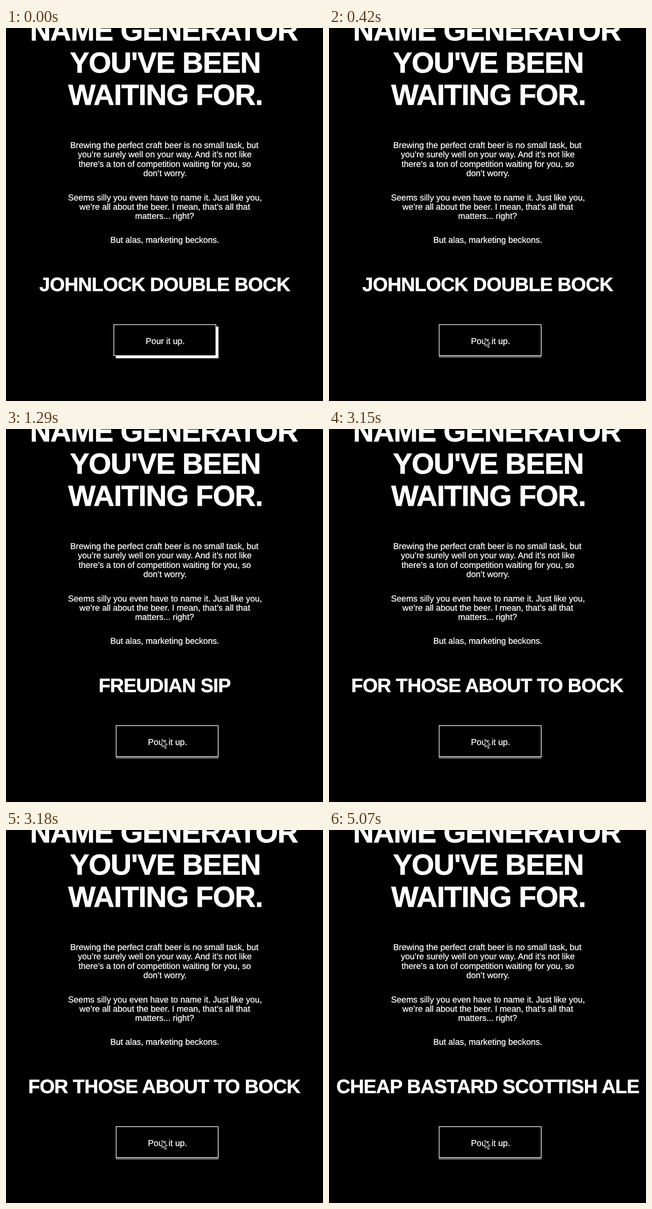
These frames come from a looping animation (690x811 px, 6.06 s). An HTML page with a canvas:

```html
<!DOCTYPE html>
<html lang="en">
<head>
<meta charset="utf-8">
<title>Beer name generator</title>
<style>
  html, body { margin: 0; width: 100%; height: 100%; overflow: hidden; background: #000; }
  canvas { display: block; }
</style>
</head>
<body>
<canvas id="stage" width="690" height="811"></canvas>
<script>
const ctx = document.getElementById('stage').getContext('2d');
const LOOP = 6060;
const STEP = 30;
const FAMILY = '"Liberation Sans", Arial, sans-serif';

// track is letter spacing, heft thickens the strokes; both in px.
const TITLE = { font: `bold 63px ${FAMILY}`, track: -1.2, heft: 0.8 };
const RESULT = { font: `bold 42.2px ${FAMILY}`, track: -0.85, heft: 0.6 };
const BODY = { font: `18.6px ${FAMILY}`, track: -0.05, heft: 0.3 };
const LABEL = { font: `18.8px ${FAMILY}`, track: -0.05, heft: 0.3 };

const title = ['NAME GENERATOR', "YOU'VE BEEN", 'WAITING FOR.'];

const paragraphs = [
  [261, ['Brewing the perfect craft beer is no small task, but',
         'you’re surely well on your way. And it’s not like',
         'there’s a ton of competition waiting for you, so',
         'don’t worry.']],
  [374.5, ['Seems silly you even have to name it. Just like you,',
           'we’re all about the beer. I mean, that’s all that',
           'matters... right?']],
  [467, ['But alas, marketing beckons.']],
];

const results = [
  [0, 'JOHNLOCK DOUBLE BOCK'],
  [1290, 'FREUDIAN SIP'],
  [2190, 'CHARLES BARLEY'],
  [3150, 'FOR THOSE ABOUT TO BOCK'],
  [4080, 'CHARLES BARLEY'],
  [5070, 'CHEAP BASTARD SCOTTISH ALE'],
];

const arrow = [[0, 0], [0, 17], [3.8, 13.5], [6.6, 20], [9.4, 18.9], [6.7, 12.6], [11.6, 12.2]];
const enter = { x: 601, y: 787 };
const rest = { x: 339.5, y: 674.5 };
const MOVE_START = 30, MOVE_TIME = 390;
const HOVER_START = 210, HOVER_TIME = 210;

const clamp = v => Math.min(1, Math.max(0, v));
const mix = (a, b, k) => a + (b - a) * k;
const easeOut = k => 1 - (1 - k) ** 2;

// Centres the visible ink of a line on cx.
function centerText(str, style, cx, y) {
  ctx.font = style.font;
  ctx.letterSpacing = style.track + 'px';
  ctx.lineWidth = style.heft;
  ctx.lineJoin = 'miter';
  ctx.fillStyle = ctx.strokeStyle = '#fff';
  const m = ctx.measureText(str);
  const x = cx - (m.actualBoundingBoxRight - m.actualBoundingBoxLeft) / 2;
  ctx.fillText(str, x, y);
  ctx.strokeText(str, x, y);
}

function drawCopy() {
  title.forEach((line, i) => centerText(line, TITLE, 346, 27.3 + i * 69.7));
  for (const [top, lines] of paragraphs)
    lines.forEach((line, i) => centerText(line, BODY, 345.5, top + i * 20.3));
}

function drawButton(k) {
  const x = mix(234, 239, k), y = 644.3, w = 223.5, h = 68.8;
  const grey = Math.round(mix(255, 88, k));
  ctx.fillStyle = `rgb(${grey},${grey},${grey})`;
  ctx.fillRect(239, y + mix(5, 4, k), w, h);
  ctx.fillStyle = '#fff';
  ctx.fillRect(x, y, w, h);
  ctx.fillStyle = '#000';
  ctx.fillRect(x + 1.4, y + 1.4, w - 2.8, h - 2.8);
  centerText('Pour it up.', LABEL, x + 112.5, 686.5);
}

function drawCursor(k) {
  ctx.save();
  ctx.translate(mix(enter.x, rest.x, k), mix(enter.y, rest.y, k));
  ctx.beginPath();
  arrow.forEach(([x, y]) => ctx.lineTo(x, y));
  ctx.closePath();
  ctx.fillStyle = '#111';
  ctx.strokeStyle = '#bbb';
  ctx.lineWidth = 1.4;
  ctx.lineJoin = 'round';
  ctx.fill();
  ctx.stroke();
  ctx.restore();
}

function draw(now) {
  const t = Math.floor((now % LOOP) / STEP) * STEP;
  ctx.textRendering = 'geometricPrecision';
  ctx.fontKerning = 'normal';
  ctx.fillStyle = '#000';
  ctx.fillRect(0, 0, 690, 811);

  drawCopy();
  const current = results.filter(([start]) => t >= start).pop();
  centerText(current[1], RESULT, 346, 572);
  drawButton(easeOut(clamp((t - HOVER_START) / HOVER_TIME)));
  if (t >= MOVE_START) drawCursor(easeOut(clamp((t - MOVE_START) / MOVE_TIME)));
}

const origin = performance.now();
function tick() {
  draw(performance.now() - origin);
  requestAnimationFrame(tick);
}
tick();
</script>
</body>
</html>
```
